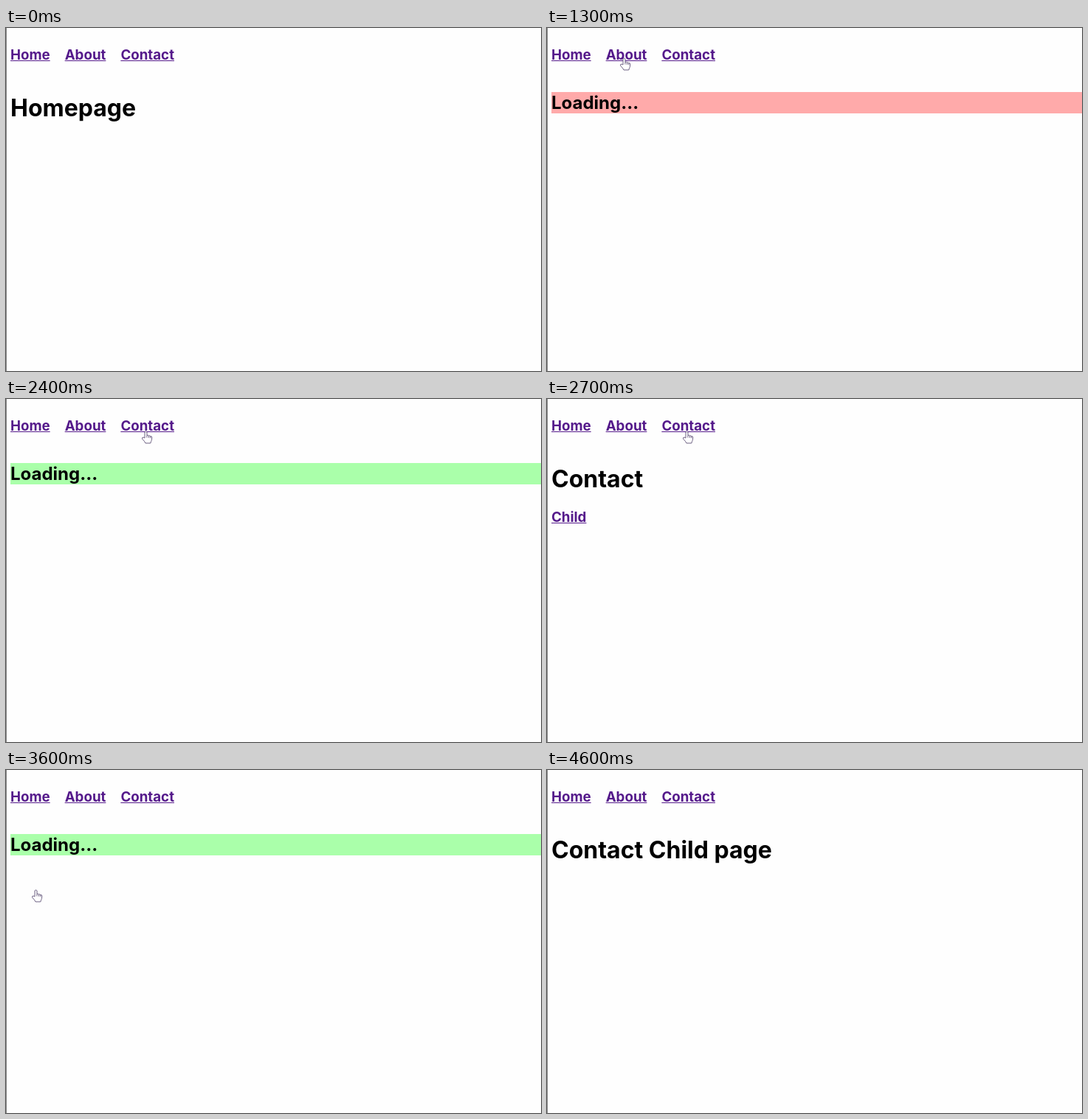
An HTML page with a canvas for the animation above (4900 ms loop, 725 px wide and 466 px high).

```html
<!DOCTYPE html>
<html lang="en">
<head>
<meta charset="utf-8">
<title>Page navigation</title>
<style>
  html, body { margin: 0; width: 100%; height: 100%; overflow: hidden; background: #fefefe; }
  body { position: relative; font-family: Inter, sans-serif; font-weight: 700; color: #000; }
  body > * { position: absolute; margin: 0; left: 6px; white-space: nowrap; }
  #edge { left: 0; top: 0; width: 1px; height: 100%; background: #858585; }
  nav { top: 25px; display: flex; gap: 20px; }
  nav, #child { font-size: 18.72px; line-height: 23px; }
  u { color: #551a8b; }
  h1 { top: 89px; font-size: 32px; line-height: 39px; }
  h2 { top: 87px; right: 0; font-size: 24px; line-height: 29px; }
  #child { top: 149px; }
  canvas { left: 0; top: 0; }
</style>
</head>
<body>
<div id="edge"></div>
<nav><u>Home</u><u>About</u><u>Contact</u></nav>
<h1></h1>
<h2>Loading...</h2>
<u id="child">Child</u>
<canvas width="725" height="466"></canvas>
<script>
const LOOP = 4900, STEP = 100;
const find = s => document.querySelector(s);
const title = find('h1'), loader = find('h2'), child = find('#child');
const ctx = find('canvas').getContext('2d');

const pages = [
  { at: 0, title: 'Homepage' },
  { at: 1300, color: '#ffaaaa' },
  { at: 1600, title: 'About' },
  { at: 2400, color: '#aaffaa' },
  { at: 2700, title: 'Contact', child: true },
  { at: 3600, color: '#aaffaa' },
  { at: 3900, title: 'Contact Child page' }
];

const smooth = u => u * u * (3 - 2 * u);
const easeOut = u => 1 - (1 - u) ** 2.5;
const easeIn = u => u ** 1.6;

// Pointer path: start time, end time, from, to, easing
const moves = [
  [200, 800, [361, 447], [86, 58], easeOut],
  [800, 1300, [86, 58], [104, 40], smooth],
  [1500, 2000, [104, 40], [189, 43], smooth],
  [2800, 3300, [189, 43], [39, 163], smooth],
  [3300, 3600, [39, 163], [39.5, 162], smooth],
  [4000, 4500, [39.5, 162], [490, 421], easeIn]
];

const arrow = new Path2D('M0 0V11.8L2.8 9.3L4.9 14L6.8 13.1L4.8 8.7H8.5Z');
const hand = new Path2D(
  'M-1.5 9.5V1.5Q0 -.6 1.5 1.5V6Q3.2 4.8 4 6.6Q5.5 5.6 6.2 7.2' +
  'Q8 6.6 8.2 8.5L8 12Q7 14 6.3 16.5H-.5Q-1.5 14 -4.8 10.8Q-5.5 8.3 -3.3 8.6Z' +
  'M1.5 6V9M4 6.6V9.2M6.2 7.2V9.6');

function pointerAt(t) {
  if (t < 200 || t > 4500) return null;
  const [start, end, from, to, ease] = moves.filter(m => m[0] <= t).pop();
  const k = ease(Math.min(1, (t - start) / (end - start)));
  return from.map((v, i) => v + (to[i] - v) * k);
}

function overLink(x, y, t) {
  const inside = (l, r, top, bottom) => x >= l && x <= r && y >= top && y <= bottom;
  return inside(80, 136, 25, 48) || inside(156, 230, 25, 48) ||
    (t >= 2700 && t < 3900 && inside(6, 52, 149, 172));
}

function drawPointer(t) {
  ctx.clearRect(0, 0, 725, 466);
  const pos = pointerAt(t);
  if (!pos) return;
  const [x, y] = pos.map(Math.round);
  const linked = overLink(x, y, t);
  const shape = linked ? hand : arrow;
  ctx.save();
  ctx.translate(x + .5, y + .5);
  ctx.fillStyle = '#fff';
  ctx.strokeStyle = linked ? '#5d5075' : '#4c4c5c';
  ctx.lineWidth = .9;
  ctx.lineJoin = 'round';
  ctx.fill(shape);
  ctx.stroke(shape);
  ctx.restore();
}

function draw(now) {
  const t = Math.floor((now % LOOP) / STEP) * STEP;
  const page = pages.filter(p => p.at <= t).pop();
  title.textContent = page.title || '';
  loader.style.display = page.color ? 'block' : 'none';
  loader.style.background = page.color || 'none';
  child.style.display = page.child ? 'block' : 'none';
  drawPointer(t);
}

const begin = performance.now();
function tick() {
  draw(performance.now() - begin);
  requestAnimationFrame(tick);
}
tick();
</script>
</body>
</html>
```
